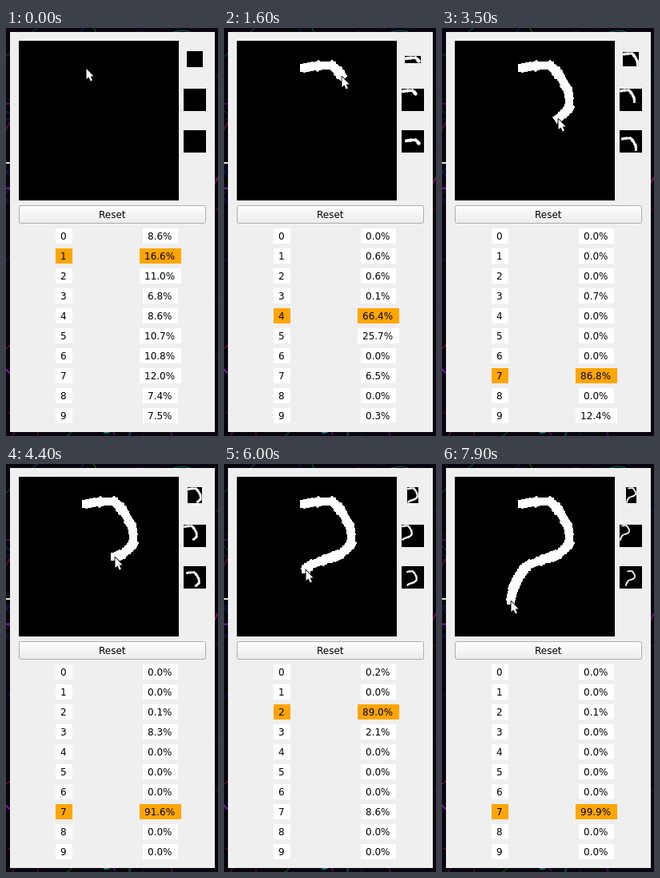
An HTML page with a canvas for the animation above (8000 ms loop, 265 px wide and 511 px high).

```html
<!DOCTYPE html>
<html lang="en">
<head>
<meta charset="utf-8">
<title>Digit recognizer</title>
<style>
  html, body { margin: 0; width: 100%; height: 100%; overflow: hidden; background: #08050d; }
  canvas { display: block; width: 265px; height: 511px; }
</style>
</head>
<body>
<canvas id="stage" width="265" height="511"></canvas>
<script>
const LOOP = 8000, STEP = 100;
const PAD = { x: 16, y: 16, size: 200 };
const BRUSH = 5;
const START = [100, 50];

// Pointer moves: first step, last step, position reached
const moves = [
  [200, 400, 111, 48], [500, 700, 122, 47], [800, 1000, 135, 47],
  [1100, 1100, 141, 52], [1200, 1600, 147, 60],
  [1900, 2000, 153, 70], [2100, 2200, 158, 80], [2300, 2400, 159, 92],
  [2600, 2600, 159, 95], [2700, 2800, 159, 98],
  [3100, 3200, 157, 102], [3300, 3400, 151, 108], [3500, 3500, 145, 113],
  [3600, 3800, 143, 114],
  [4200, 4500, 134, 117], [4600, 4700, 127, 119],
  [4900, 5000, 120, 122], [5100, 5200, 109, 126],
  [5400, 5600, 103, 131], [6000, 6000, 102, 132],
  [6100, 6500, 95, 143],
  [6700, 7100, 89, 156], [7200, 7400, 86, 168],
  [7600, 7900, 86, 171]
];

// Predictions in percent; digits left out are at zero
const results = [
  { at: 0, p: { 0: 8.6, 1: 16.6, 2: 11, 3: 6.8, 4: 8.6, 5: 10.7, 6: 10.8, 7: 12, 8: 7.4, 9: 7.5 } },
  { at: 1600, p: { 1: 0.6, 2: 0.6, 3: 0.1, 4: 66.4, 5: 25.7, 7: 6.5, 9: 0.3 } },
  { at: 2800, p: { 3: 0.7, 7: 86.8, 9: 12.4 } },
  { at: 3800, p: { 2: 0.1, 3: 8.3, 7: 91.6 } },
  { at: 4700, p: { 2: 0.4, 3: 72.5, 7: 27.1 } },
  { at: 5600, p: { 0: 0.2, 2: 89, 3: 2.1, 7: 8.6 } },
  { at: 6500, p: { 2: 12.6, 3: 0.2, 7: 87.2 } },
  { at: 7400, p: { 2: 0.1, 7: 99.9 } }
];

const stage = document.getElementById('stage');
const ctx = stage.getContext('2d');

function makeCanvas(w, h) {
  const c = document.createElement('canvas');
  c.width = w;
  c.height = h;
  return c;
}

function rect(color, x, y, w, h) {
  ctx.fillStyle = color;
  ctx.fillRect(x, y, w, h);
}

function pointerAt(t) {
  let [x, y] = START;
  for (const [from, to, nx, ny] of moves) {
    const begin = from - STEP;
    if (t <= begin) break;
    const u = Math.min(1, (t - begin) / (to - begin));
    x += (nx - x) * u;
    y += (ny - y) * u;
  }
  return [Math.round(x), Math.round(y)];
}

// Hard-edged segment with square caps, as a plain bitmap brush leaves it
function stampSegment(bits, a, b) {
  const dx = b[0] - a[0], dy = b[1] - a[1];
  const len = Math.hypot(dx, dy);
  const ux = dx / len, uy = dy / len;
  const reach = 8;
  const x0 = Math.min(a[0], b[0]) - reach, x1 = Math.max(a[0], b[0]) + reach;
  const y0 = Math.min(a[1], b[1]) - reach, y1 = Math.max(a[1], b[1]) + reach;
  for (let y = y0; y < y1; y++) {
    for (let x = x0; x < x1; x++) {
      const px = x + 0.5 - a[0], py = y + 0.5 - a[1];
      const along = px * ux + py * uy, across = py * ux - px * uy;
      if (along >= -BRUSH && along <= len + BRUSH && Math.abs(across) <= BRUSH) {
        bits[(y - PAD.y) * PAD.size + x - PAD.x] = 1;
      }
    }
  }
}

function drawingAt(t) {
  const n = PAD.size, bits = new Uint8Array(n * n);
  let last = START;
  for (let s = 50; s <= t; s += 50) {
    const p = pointerAt(s);
    if (p[0] === last[0] && p[1] === last[1]) continue;
    stampSegment(bits, last, p);
    last = p;
  }

  const canvas = makeCanvas(n, n), c = canvas.getContext('2d');
  const img = c.createImageData(n, n);
  let left = n, top = n, right = 0, bottom = 0, sx = 0, sy = 0, mass = 0;
  bits.forEach((on, i) => {
    img.data.fill(on ? 255 : 0, i * 4, i * 4 + 3);
    img.data[i * 4 + 3] = 255;
    if (!on) return;
    const x = i % n, y = Math.floor(i / n);
    left = Math.min(left, x);
    right = Math.max(right, x + 1);
    top = Math.min(top, y);
    bottom = Math.max(bottom, y + 1);
    sx += x + 0.5;
    sy += y + 0.5;
    mass++;
  });
  c.putImageData(img, 0, 0);
  return { canvas, left, top, w: right - left, h: bottom - top, cx: sx / mass, cy: sy / mass, mass };
}

function drawBackdrop() {
  let seed = 41;
  const rnd = () => (seed = (seed * 16807) % 2147483647) / 2147483647;
  rect('#08050d', 0, 0, 265, 511);
  const hues = [285, 320, 135, 225, 350, 180];
  for (let i = 0; i < 170; i++) {
    const x = rnd() * 265, y = rnd() * 511, a = rnd() * 6.28, r = 15 + rnd() * 40;
    ctx.strokeStyle = `hsla(${hues[i % 6]}, 85%, ${22 + rnd() * 28}%, ${0.3 + rnd() * 0.5})`;
    ctx.lineWidth = 0.6 + rnd() * 1.6;
    ctx.beginPath();
    ctx.moveTo(x, y);
    ctx.quadraticCurveTo(x + r * Math.cos(a), y + r * Math.sin(a), x + r * Math.cos(a + 0.6), y + r * 1.6 * Math.sin(a + 0.6));
    ctx.stroke();
  }
  rect('#d8e6de', 0, 168, 5, 2);
  rect('#efefef', 5, 5, 256, 501);
}

function drawButton() {
  const fill = ctx.createLinearGradient(0, 222, 0, 245);
  fill.addColorStop(0, '#ffffff');
  fill.addColorStop(1, '#ebebeb');
  ctx.beginPath();
  ctx.roundRect(16.5, 222.5, 233, 22, 2);
  ctx.fillStyle = fill;
  ctx.fill();
  ctx.strokeStyle = '#adadad';
  ctx.lineWidth = 1;
  ctx.stroke();
  ctx.fillStyle = '#000';
  ctx.fillText('Reset', 116, 238);
}

function drawThumbs(d) {
  rect('#000', 222, 76, 28, 28);
  rect('#000', 222, 128, 28, 28);
  if (!d.mass) {
    rect('#000', 226, 29, 20, 20);
    return;
  }
  const k = 20 / Math.max(d.w, d.h);
  const w = Math.round(d.w * k), h = Math.round(d.h * k);
  const small = makeCanvas(w, h), c = small.getContext('2d');
  c.imageSmoothingQuality = 'high';
  c.drawImage(d.canvas, d.left, d.top, d.w, d.h, 0, 0, w, h);
  ctx.drawImage(small, 236 - Math.floor(w / 2), 39 - Math.floor(h / 2));
  ctx.drawImage(small, 222, 76);
  ctx.drawImage(small, 236 - Math.round((d.cx - d.left) * k), 142 - Math.round((d.cy - d.top) * k));
}

function drawResults(p) {
  const values = Array.from({ length: 10 }, (_, i) => p[i] || 0);
  const best = values.indexOf(Math.max(...values));
  values.forEach((v, i) => {
    const y = 251 + i * 25, color = i === best ? '#ffa500' : '#fff';
    const w = v >= 10 ? 52 : 44, x = 193 - w / 2;
    rect(color, 62, y, 21, 19);
    rect(color, x, y, w, 19);
    ctx.fillStyle = '#000';
    ctx.fillText(i, 68, y + 14);
    ctx.fillText(v.toFixed(1) + '%', x + 6, y + 14);
  });
}

function drawPointer([x, y]) {
  ctx.save();
  ctx.translate(x + 0.5, y + 1);
  ctx.beginPath();
  [[0, 0], [0, 13], [3, 10.4], [5.2, 15.6], [7.4, 14.6], [5.2, 9.6], [9, 9.4]]
    .forEach(p => ctx.lineTo(...p));
  ctx.closePath();
  ctx.lineJoin = 'round';
  ctx.lineWidth = 1.8;
  ctx.strokeStyle = '#000';
  ctx.stroke();
  ctx.fillStyle = '#fff';
  ctx.fill();
  ctx.restore();
}

function draw(t) {
  const result = results.filter(r => r.at <= t).pop();
  ctx.font = '12px "DejaVu Sans", sans-serif';
  drawBackdrop();
  ctx.drawImage(drawingAt(t).canvas, PAD.x, PAD.y);
  drawThumbs(drawingAt(result.at));
  drawButton();
  drawResults(result.p);
  drawPointer(pointerAt(t));
}

let shown = -1;
function tick() {
  const t = Math.floor((performance.now() % LOOP) / STEP) * STEP;
  if (t !== shown) draw(shown = t);
  requestAnimationFrame(tick);
}
tick();
</script>
</body>
</html>
```
